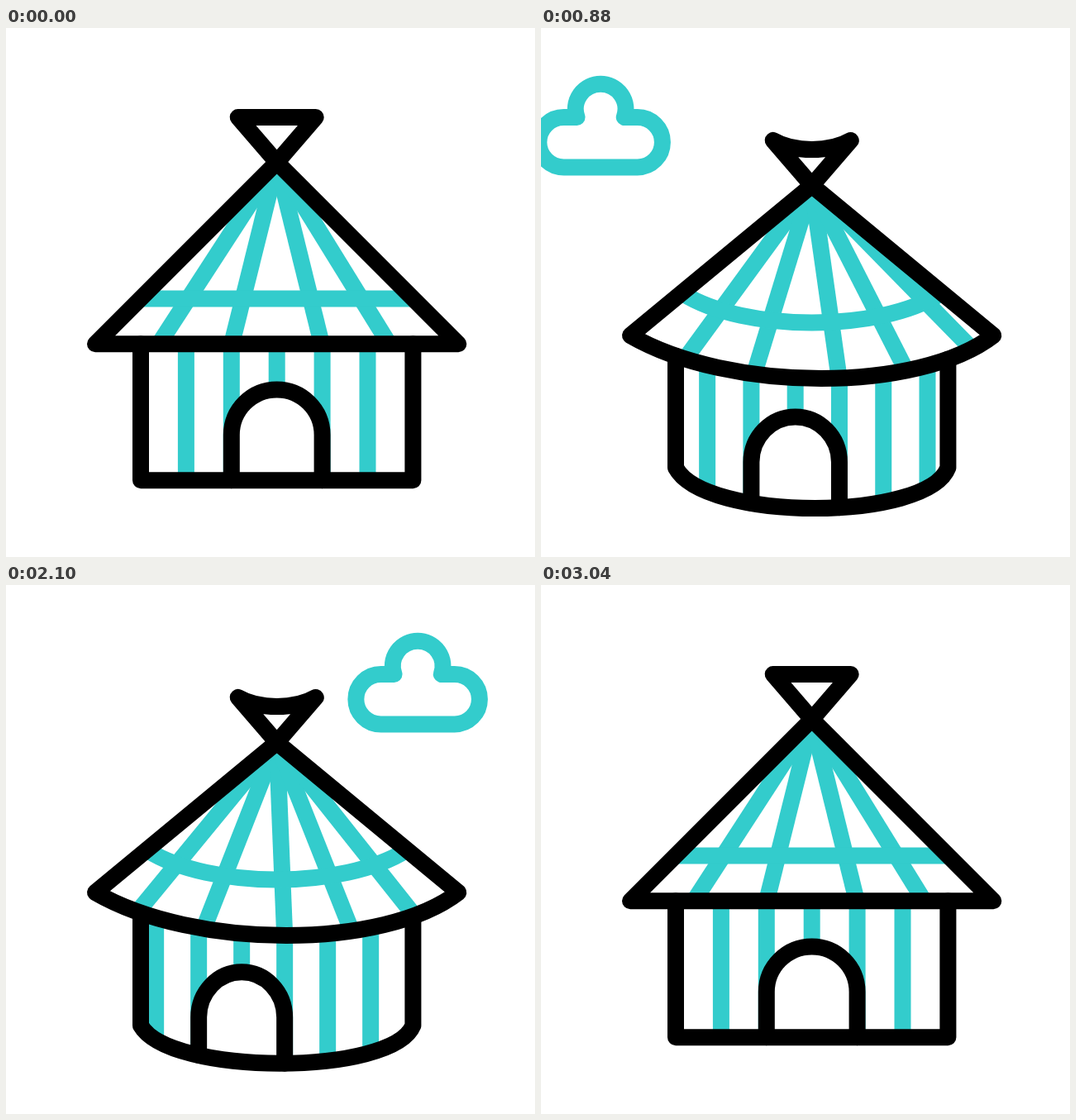
An HTML page with a canvas for the animation above (3400 ms loop, 640 by 640 pixels).

```html
<!DOCTYPE html>
<html lang="en">
<head>
<meta charset="utf-8">
<title>Round hut</title>
<style>
  html, body { margin: 0; width: 100%; height: 100%; overflow: hidden; background: #fff; }
  canvas { display: block; }
</style>
</head>
<body>
<canvas id="stage" width="640" height="640"></canvas>
<script>
const ctx = document.getElementById('stage').getContext('2d');
const LOOP = 3400, TEAL = '#33cccc', BLACK = '#000';
const MID = 327.7, LEFT = 163, RIGHT = 492.4, GAP = 54.9;

// Where the roof lines meet the eave, at rest and after the turn
const ROOF_REST = [185, 273, 382, 463.5, 547.3];
const ROOF_TURNED = [166, 246, 344, 425, 501];

const lerp = (a, b, u) => a + (b - a) * u;
const ease = (t, from, to) => {
  const u = Math.min(1, Math.max(0, (t - from) / (to - from)));
  return u * u * (3 - 2 * u);
};

// Sagging cubic between two points of equal height; a and b are the handle insets
function bow(x0, x1, y, sag, a, b) {
  const x2 = x0 + a, x3 = x1 - b, low = y + sag / 0.75;
  return {
    d: `${x0} ${y}C${x2} ${low} ${x3} ${low} ${x1} ${y}`,
    at(x) {
      let lo = 0, hi = 1, u;
      for (let i = 0; i < 20; i++) {
        u = (lo + hi) / 2;
        const v = 1 - u;
        const px = v * v * v * x0 + 3 * u * v * (v * x2 + u * x3) + u * u * u * x1;
        if (px < x) lo = u; else hi = u;
      }
      return y + 4 * u * (1 - u) * sag;
    }
  };
}

function stroke(d, color, cap = 'butt', fill) {
  const path = new Path2D(d);
  if (fill) {
    ctx.fillStyle = fill;
    ctx.fill(path);
  }
  ctx.lineWidth = 20;
  ctx.lineCap = cap;
  ctx.lineJoin = 'round';
  ctx.strokeStyle = color;
  ctx.stroke(path);
}

function drawCloud(x) {
  ctx.save();
  ctx.translate(x, 0);
  stroke('M-28.6 108A30.3 30.3 0 1 1 28.6 108H44.6a30.2 30.2 0 0 1 0 60.4' +
    'H-44.6a30.2 30.2 0 0 1 0-60.4Z', TEAL);
  ctx.restore();
}

function draw(t) {
  const depth = ease(t, 200, 600) * (1 - ease(t, 2250, 3040));
  const turn = ease(t, 600, 1120);
  const drift = ease(t, 1140, 2250);
  const back = ease(t, 2290, 3040);
  const wallDepth = depth * (1 - 0.07 * drift);
  const shift = (rest, turned) =>
    lerp(lerp(rest, turned, turn) - 7.2 * drift, rest, back);
  const turning = turn > 0 && back < 1;

  const apex = 162.5 + 28 * depth;
  const eave = bow(108, 547.3, 382.3 - 10.3 * depth, 52 * depth, 120, 90);
  const floor = bow(LEFT, RIGHT, 547.2 - 15.2 * wallDepth, 49 * wallDepth, 35, 25);
  const stripes = [0, 1, 2, 3, 4, 5].map(i => shift(217.9 + GAP * i, 188 + 52 * i));

  ctx.fillStyle = '#fff';
  ctx.fillRect(0, 0, 640, 640);
  drawCloud(-26 + 0.3492 * (t - 600));

  // Wall
  stripes.forEach((x, i) => {
    if (i < 5 || turning) stroke(`M${x} ${eave.at(x)}V${floor.at(x)}`, TEAL);
  });
  const [, doorL, doorMid, doorR] = stripes;
  const spring = 492.3 + 33 * wallDepth;
  stroke(`M${doorL} ${floor.at(doorL)}V${spring}` +
    `A${doorMid - doorL} 54.9 0 0 1 ${doorR} ${spring}V${floor.at(doorR)}`,
    BLACK, 'round', '#fff');
  stroke(`M${LEFT} ${eave.at(LEFT)}L${floor.d}V${eave.at(RIGHT)}`, BLACK, 'round');

  // Roof
  ROOF_REST.forEach((rest, i) => {
    const x = shift(rest, ROOF_TURNED[i]);
    if (i < 4 || turning) stroke(`M${MID} ${apex}L${x} ${eave.at(x)}`, TEAL);
  });
  const reach = 164.7 - 9 * depth;
  const band = bow(MID - reach, MID + reach, 327.6 - 6 * depth, 35 * depth, 75, 75);
  stroke(`M${band.d}`, TEAL);
  stroke(`M${MID} ${apex}L${eave.d}Z`, BLACK);

  const finial = bow(280.7, 374.7, 108 + 28 * depth, 11 * depth, 25, 25);
  stroke(`M${MID} ${apex}L${finial.d}Z`, BLACK, 'round', '#fff');
}

const start = performance.now();
function frame() {
  draw((performance.now() - start) % LOOP);
  requestAnimationFrame(frame);
}
frame();
</script>
</body>
</html>
```
